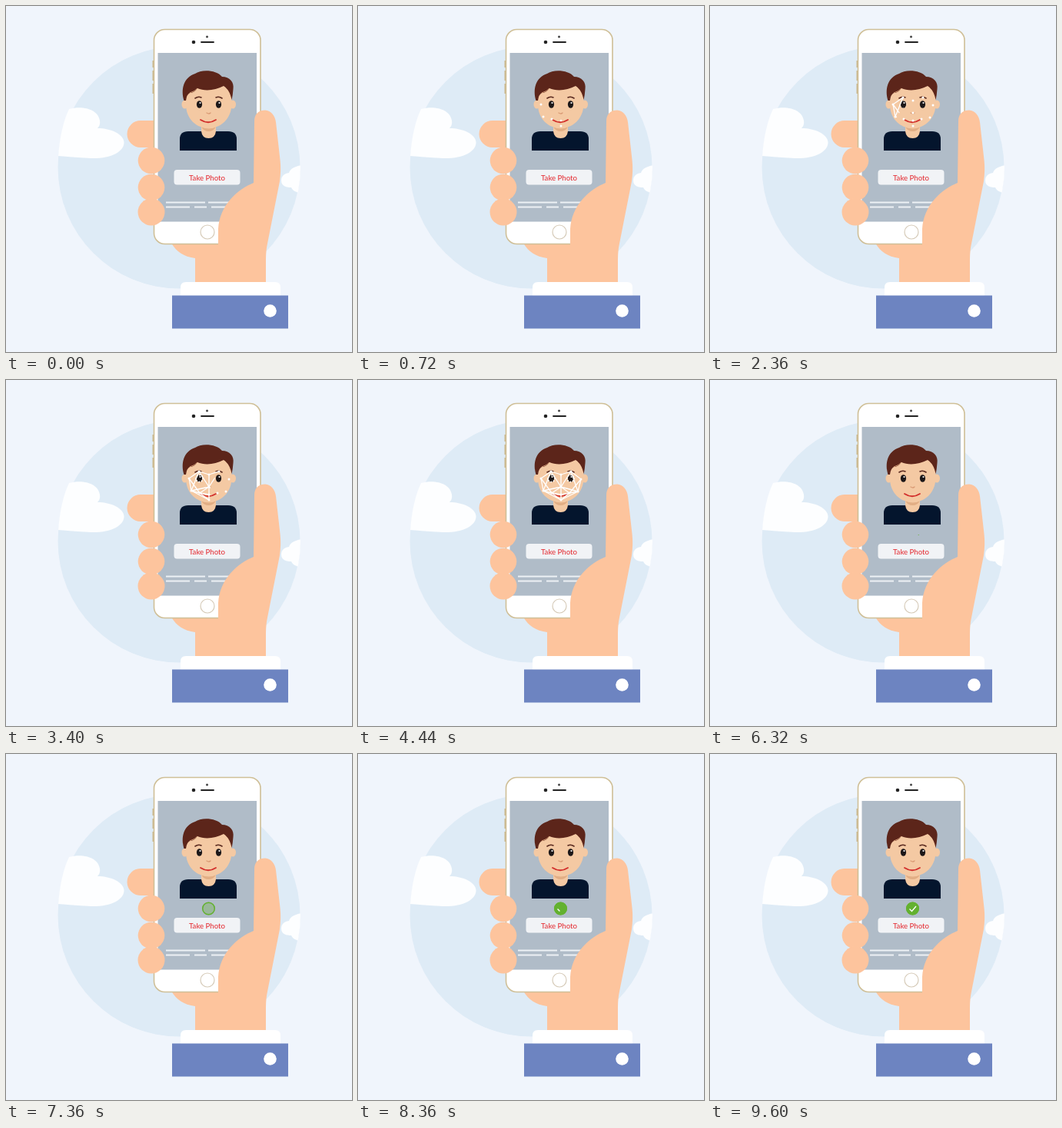
An HTML page for the animation above (9720 ms loop, 450x450 px).

```html
<!DOCTYPE html>
<html lang="en">
<head>
<meta charset="utf-8">
<title>Face scan</title>
<style>
html, body { margin: 0; width: 100%; height: 100%; overflow: hidden; background: #f0f5fc; }
svg { display: block; width: 100%; height: 100%; }
.skin { fill: #fdc49d; }
.face { fill: #f4c9a3; }
.hair { fill: #5c251a; }
text { font: 500 9.6px Lato, sans-serif; fill: #e5343a; text-anchor: middle; }
</style>
</head>
<body>
<svg viewBox="0 0 450 450">
  <defs><clipPath id="disc"><circle cx="225" cy="210" r="158"/></clipPath></defs>

  <!-- sky -->
  <circle cx="225" cy="210" r="157.500" fill="#deebf6"/>
  <path fill="#fdfeff" d="M68 195C70 171 74 151 82 134C101 129 120 135 122 149Q123 155 119 159C137 159 153 167 153.500 177C154 190 135 199 110 198Q90 197 68 195Z"/>
  <path clip-path="url(#disc)" fill="#fdfeff" d="M390 206C376 208 370 211 368 217C361 218 358 222 358 227C358 235 366 236 371 236C373 241 380 244 390 244Z"/>

  <!-- back of the hand -->
  <path class="skin" d="M200 149H175a17.500 17.500 0 0 0 0 35H200ZM215 308Q224 325 246 328V360H338V300H215Z"/>

  <!-- phone -->
  <path d="M191.500 71V80M191.500 84V97M191.500 101V114" stroke="#c9b78d" stroke-width="2"/>
  <rect x="192.500" y="30.500" width="138.500" height="279" rx="14" fill="#fff" stroke="#cfbf97" stroke-width="1.600"/>
  <rect x="197.500" y="61" width="128.500" height="219.500" fill="#b0bcc8"/>
  <circle cx="261.500" cy="40" r="1.500" fill="#444"/>
  <circle cx="244" cy="47" r="2.300" fill="#222"/>
  <path d="M254 47H270" stroke="#222" stroke-width="1.800" stroke-linecap="round"/>
  <circle cx="262" cy="294" r="9" fill="#fff" stroke="#d6cbb9" stroke-width="1.200"/>
  <path d="M208 255.500H259M263 255.500H295M208 261.500H239M245 261.500H261M267 261.500H290" stroke="#edf1f5" stroke-width="1.800"/>

  <!-- portrait -->
  <path fill="#04152d" d="M226 188V173Q226 163 237 163H289Q300 163 300 173V188Z"/>
  <path class="face" d="M254 152H273V163Q272 172 263.500 172T254 163Z"/>
  <path fill="#e2ae85" d="M254 157Q264 162 273 157Q270 163 263.500 163T254 157Z"/>
  <ellipse class="face" cx="232.500" cy="128" rx="4" ry="5.500"/>
  <ellipse class="face" cx="295" cy="128" rx="4" ry="5.500"/>
  <path class="face" d="M234 112Q234 96 264 96T293.500 112V128C293 147 279 159 263.500 159S234 147 234 128Z"/>
  <path class="hair" d="M231.500 123C227 108 231 93 246 88C254 82 274 83 281 92C291 92 297 99 295.500 108Q295 116 293.500 122C292 114 289 108 283 104C272 110 258 111 249 107C246 111 243 113 239 113Q235 115 234 123Z"/>
  <path d="M239 113Q246 111 249 107" fill="none" stroke="#d69d78" stroke-width="1"/>
  <g fill="none" stroke-linecap="round">
    <path d="M246 120Q250 117 254 119M273 119Q277 117 281 120" stroke="#59291e" stroke-width="1.600"/>
    <path d="M261 139Q264 141 266 139" stroke="#d99b75" stroke-width="1.300"/>
    <path d="M253 148Q263 154.500 273 148" stroke="#d22f2c" stroke-width="1.800"/>
  </g>
  <g fill="#1c1718"><ellipse cx="251.500" cy="128" rx="3.600" ry="4.800"/><ellipse cx="276.500" cy="128" rx="3.600" ry="4.800"/></g>
  <g fill="#fff"><circle cx="252.500" cy="126" r="1.100"/><circle cx="277.500" cy="126" r="1.100"/></g>

  <g id="mesh" fill="none" stroke="#fff" stroke-width="1.300" stroke-linecap="round"></g>

  <!-- button and badge -->
  <g id="button">
    <rect x="218.500" y="213" width="86" height="19.500" rx="4" fill="#f1f3f6"/>
    <text x="261.500" y="226.700">Take Photo</text>
  </g>
  <g fill="none">
    <circle id="fill" cx="263.500" cy="201" r="8.500" fill="#63b12f"/>
    <circle id="ring" cx="263.500" cy="201" r="7.800" stroke="#63b12f" stroke-width="1.500" pathLength="1" stroke-dasharray="1 2"/>
    <path id="tick" d="M259.500 201.500L262.500 204.500L268 198" stroke="#fff" stroke-width="1.300" pathLength="1" stroke-dasharray="1 2"/>
  </g>

  <!-- front of the hand -->
  <g class="skin">
    <circle cx="189" cy="201" r="17.300"/><circle cx="189" cy="236" r="17.300"/><circle cx="189" cy="268" r="17.500"/>
    <path d="M323 150C323 140 329 135.500 337 135.500C345 136 350 143 351 151L356.500 200Q358 213 356 228L340 309Q338 318 338 330V360H246V311H276V290C278 258 302 238 322 230Z"/>
  </g>
  <path fill="#fff" d="M227 378V366Q227 359 234 359H350Q357 359 357 366V378Z"/>
  <rect x="216" y="376.500" width="151" height="43" fill="#6d84c1"/>
  <circle cx="343.500" cy="396.500" r="8.300" fill="#fff"/>
</svg>

<script>
const LOOP = 9720;
const get = id => document.getElementById(id);
const ramp = (t, start, length) => Math.min(1, Math.max(0, (t - start) / length));
const ease = x => x * x * (3 - 2 * x);
const mesh = get('mesh');

function add(name, attributes) {
  const node = document.createElementNS('http://www.w3.org/2000/svg', name);
  for (const key in attributes) node.setAttribute(key, attributes[key]);
  return mesh.appendChild(node);
}

// Landmarks in their order of appearance
const points = {
  earL: [238, 128], jawL: [241, 144], lipL: [252, 147], chin: [264, 156],
  lip: [264, 149], lipR: [275, 147], nose: [264, 139], jawR: [286, 145],
  earR: [290, 129], browR: [277, 119], bridge: [264, 123], browL: [251, 119]
};
const links = `earL-browL earL-jawL browL-jawL earL-lipL jawL-lipL browL-bridge
  browL-nose jawL-nose lipL-nose bridge-nose jawL-chin lipL-chin lipL-lip
  nose-lip lip-chin bridge-browR nose-browR nose-lipR lip-lipR lipR-chin
  nose-jawR lipR-jawR chin-jawR browR-jawR browR-earR lipR-earR earR-jawR`.split(/\s+/);

const lines = links.map(link => {
  const [a, b] = link.split('-').map(key => points[key]);
  return add('path', { d: `M${a}L${b}`, pathLength: 1, 'stroke-dasharray': '1 2' });
});
const dots = Object.values(points).map(([cx, cy]) =>
  add('circle', { cx, cy, r: 1.5, fill: '#fff', stroke: 'none' }));
const eyes = [251.5, 276.5].map(cx =>
  add('circle', { cx, cy: 128, r: 4.5, 'stroke-dasharray': '.1 3.43', 'stroke-width': 1.9 }));

function trace(node, amount) {
  node.style.strokeDashoffset = 1 - amount;
  node.style.visibility = amount > 0 ? 'visible' : 'hidden';
}

function draw(now) {
  const t = now % LOOP;
  const press = 1 - .03 * Math.sin(Math.PI * ramp(t, 60, 300));
  get('button').setAttribute('transform',
    `translate(261 222.7) scale(${press}) translate(-261 -222.7)`);

  mesh.style.opacity = 1 - ease(ramp(t, 5700, 540));
  dots.forEach((dot, i) => dot.setAttribute('r', 1.5 * ease(ramp(t, 150 + i * 110, 160))));
  lines.forEach((line, i) => trace(line, ease(ramp(t, 1980 + i * 80, 260))));
  eyes.forEach((eye, i) => eye.style.opacity = ramp(t, 2250 + i * 1500, 400));

  trace(get('ring'), ease(ramp(t, 6260, 900)));
  get('fill').style.opacity = ease(ramp(t, 7040, 880));
  trace(get('tick'), ease(ramp(t, 8040, 840)));
  requestAnimationFrame(() => draw(performance.now()));
}
draw(0);
</script>
</body>
</html>
```
